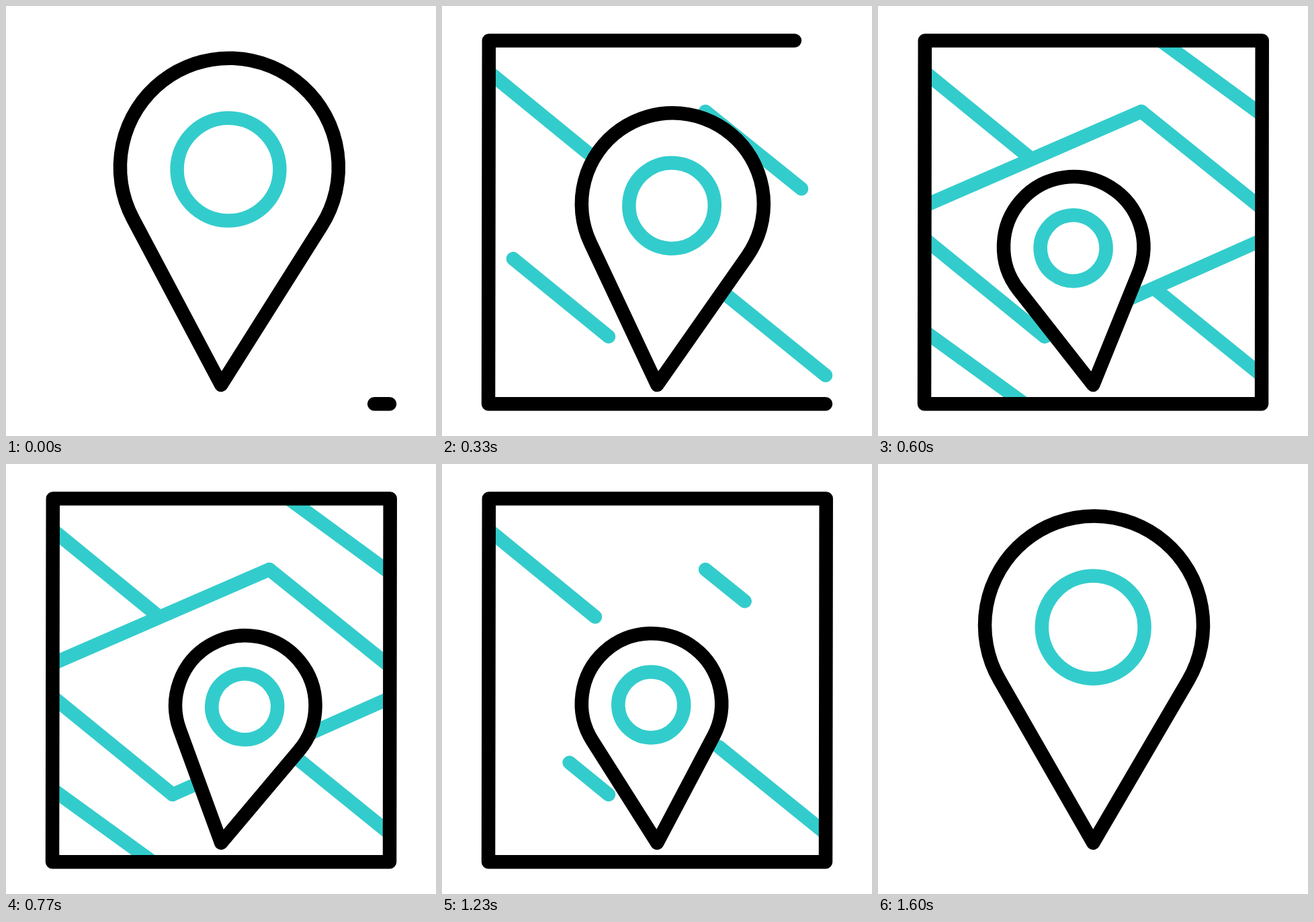
An HTML page with a canvas for the animation above (1.67 s loop, 640 by 640 pixels).

```html
<!DOCTYPE html>
<html lang="en">
<head>
<meta charset="utf-8">
<title>Map pin</title>
<style>
  html, body { margin: 0; height: 100%; overflow: hidden; background: #fff; }
  canvas { display: block; }
</style>
</head>
<body>
<canvas id="stage" width="640" height="640"></canvas>
<script>
const ctx = document.getElementById('stage').getContext('2d');
const LOOP = 1670, TEAL = '#33cccc', BLACK = '#000', WIDTH = 20.5;
const SMALL = 0.641;

// All timings are in ticks of 1/30 s: [grow start, grow end, shrink start, shrink end]
const BORDER = { time: [-1.05, 15.95, 37.4, 48],
  points: [[571, 592.2], [69, 592.2], [69.8, 51.5], [571.7, 51.5], [571, 592.2]] };
const MAIN = [3.05, 9.65, 37, 43];
const BEND = [5.3, 11.9, 33.3, 39.3];
const CROSS = [10, 16, 28.9, 34.9];
const CORNER = [10, 16, 32, 37];
const ROADS = [
  { time: MAIN, points: [[70, 98.5], [228, 227.5]] },
  { time: MAIN, points: [[571, 549.8], [412, 421]] },
  { time: BEND, points: [[392, 157], [571, 301]] },
  { time: BEND, points: [[248, 492], [70, 347]] },
  { time: CROSS, points: [[392, 157], [70, 297]] },
  { time: CROSS, points: [[248, 492], [571, 348.5]] },
  { time: CORNER, points: [[420.5, 51.5], [571.5, 162]] },
  { time: CORNER, points: [[218, 592], [69, 484]] }
];
const PIN_SHRINK = [5.25, 15.25, 38, 48];
// Pendulum swing: [tick, degrees]
const SWING = [[-1.15, 0], [5.7, 25.6], [14.8, -20], [22.3, 10], [32.5, -5], [41.5, 0]];
const PIN = new Path2D('M0 0L-139.6-243.1A162.5 162.5 0 1 1 141.5-241.9Z');

function ease(tick, start, end) {
  const u = Math.min(1, Math.max(0, (tick - start) / (end - start)));
  return u * u * (3 - 2 * u);
}

function inAndOut(tick, [a, b, c, d]) {
  return ease(tick, a, b) * (1 - ease(tick, c, d));
}

function swingAngle(tick) {
  let angle = SWING[0][1];
  for (let i = 1; i < SWING.length; i++) {
    const [from, a] = SWING[i - 1], [to, b] = SWING[i];
    angle += (b - a) * ease(tick, from, to);
  }
  return angle * Math.PI / 180;
}

function drawLine({ time, points }, color, tick) {
  const part = inAndOut(tick, time);
  if (part <= 0) return;
  let length = 0;
  ctx.beginPath();
  points.forEach(([x, y], i) => {
    if (i) length += Math.hypot(x - points[i - 1][0], y - points[i - 1][1]);
    ctx.lineTo(x, y);
  });
  ctx.setLineDash(part < 1 ? [length * part, length * 2] : []);
  ctx.strokeStyle = color;
  ctx.stroke();
}

function drawPin(tick) {
  const scale = 1 - (1 - SMALL) * inAndOut(tick, PIN_SHRINK);
  ctx.save();
  ctx.translate(320.2, 564);
  ctx.rotate(swingAngle(tick));
  ctx.scale(scale, scale);
  ctx.lineWidth = WIDTH / scale;
  ctx.setLineDash([]);
  ctx.fillStyle = '#fff';
  ctx.fill(PIN);
  ctx.strokeStyle = BLACK;
  ctx.stroke(PIN);
  ctx.beginPath();
  ctx.arc(0, -321, 76.4, 0, Math.PI * 2);
  ctx.strokeStyle = TEAL;
  ctx.stroke();
  ctx.restore();
}

function draw() {
  const tick = Math.floor((performance.now() % LOOP) * 0.03 + 0.1);
  ctx.fillStyle = '#fff';
  ctx.fillRect(0, 0, 640, 640);
  ctx.lineWidth = WIDTH;
  ctx.lineCap = ctx.lineJoin = 'round';
  ROADS.forEach(road => drawLine(road, TEAL, tick));
  drawLine(BORDER, BLACK, tick);
  drawPin(tick);
  requestAnimationFrame(draw);
}
draw();
</script>
</body>
</html>
```
